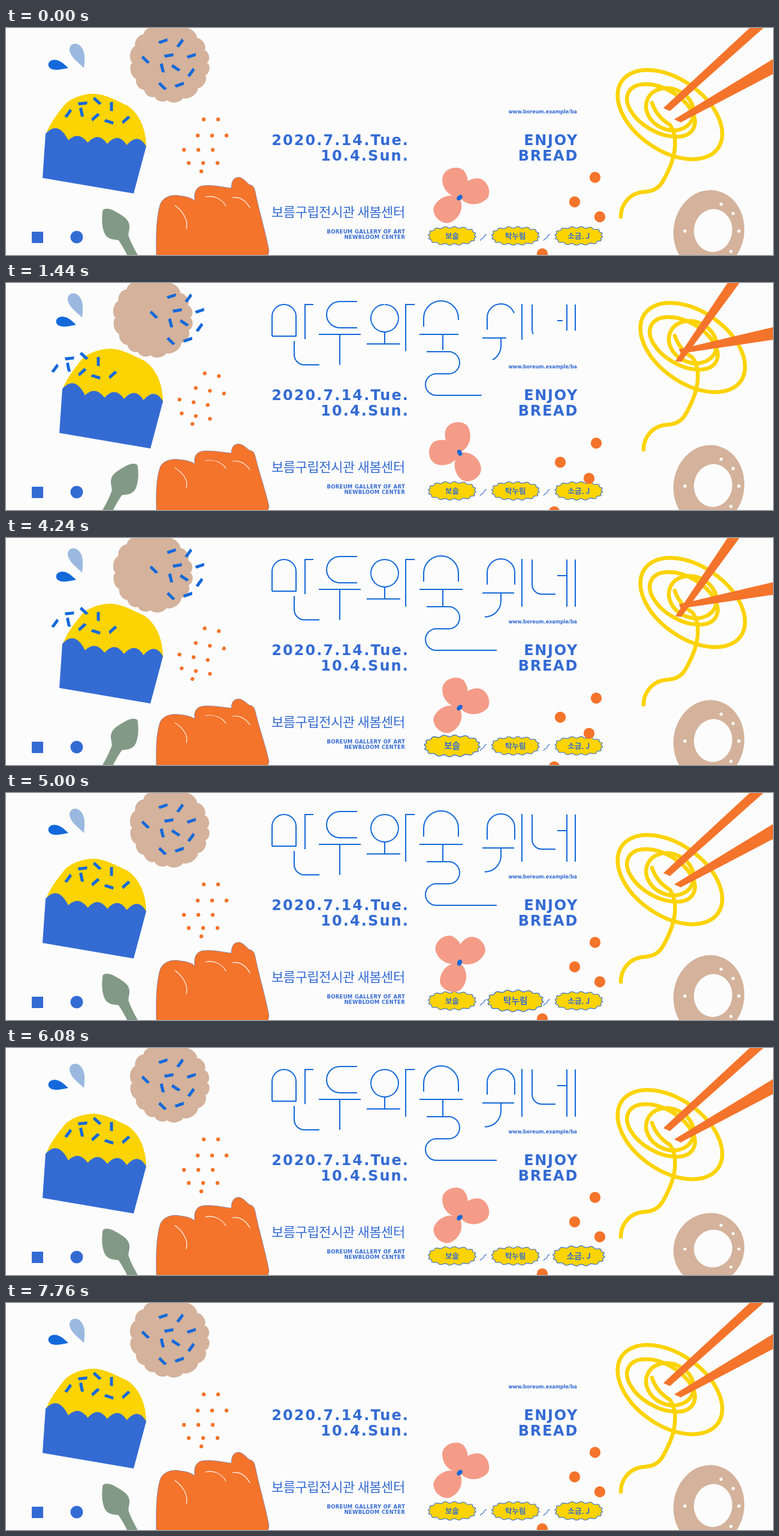
Write an HTML page with a canvas that moves like this. It is 1280x380 px and loops after 8680 ms.

```html
<!DOCTYPE html>
<html lang="ko">
<head>
<meta charset="utf-8">
<title>만두와술 쉬네</title>
<style>
html, body { margin: 0; width: 100%; height: 100%; overflow: hidden; background: #fcfcfc; }
canvas { display: block; width: 1280px; height: 380px; }
</style>
</head>
<body>
<canvas id="stage" width="1280" height="380"></canvas>
<script>
const ctx = document.getElementById('stage').getContext('2d');
const LOOP = 8680, STEP = 40, SWAP = 1240, TURN = Math.PI * 2;
const C = {
  paper: '#fcfcfc', yellow: '#fcd303', orange: '#f4742b', blue: '#346bd3', vivid: '#1469da',
  tan: '#d4b29b', pink: '#f49c88', green: '#829a85', sky: '#9bb9df'
};
const WIDE = '"DejaVu Sans", sans-serif';
const HANGUL = '"Noto Sans CJK KR", "Noto Sans CJK", sans-serif';

const rad = deg => deg * Math.PI / 180;
const clamp = x => Math.min(1, Math.max(0, x));
const ease = x => (1 - Math.cos(Math.PI * clamp(x))) / 2;
const progress = (t, start, length) => ease((t - start) / length);
// rises for one half and falls for the next
const pulse = (t, start, half) => progress(t, start, half) - progress(t, start + half, half);

function fill(path, color) {
  ctx.fillStyle = color;
  ctx.fill(path);
}

function stroke(path, color, width) {
  ctx.strokeStyle = color;
  ctx.lineWidth = width;
  ctx.stroke(path);
}

function dot(x, y, radius, color) {
  ctx.fillStyle = color;
  ctx.beginPath();
  ctx.arc(x, y, radius, 0, TURN);
  ctx.fill();
}

function oval(x, y, rx, ry, tilt) {
  const path = new Path2D();
  path.ellipse(x, y, rx, ry, rad(tilt), 0, TURN);
  return path;
}

// Closed outline from a function of the angle
function outline(point) {
  const path = new Path2D();
  for (let a = 0; a < TURN; a += TURN / 240) path.lineTo(...point(a));
  path.closePath();
  return path;
}

function at(x, y, draw, { angle = 0, sx = 1, sy = sx } = {}) {
  ctx.save();
  ctx.translate(x, y);
  ctx.rotate(rad(angle));
  ctx.scale(sx, sy);
  draw();
  ctx.restore();
}

function text(str, x, y, font, align = 'right', spacing = 0) {
  ctx.font = font;
  ctx.textAlign = align;
  ctx.letterSpacing = spacing + 'px';
  ctx.fillStyle = C.blue;
  ctx.fillText(str, x, y);
}

// Title strokes, one group per syllable
const title = [
  ['M444 89V56A20 20 0 0 1 484 56V89H444', 'M513 36H499V94', 'M481 97V120A17 17 0 0 0 498 137H523'],
  ['M586 31H557A22 22 0 0 0 557 75H586', 'M522 86H592', 'M557 86V137'],
  ['M632 36A23 23 0 1 1 631.9 36', 'M632 82V102', 'M602 102H658', 'M682 36H667V115'],
  ['M697 73V59A29 29 0 0 1 755 59V73', 'M690 86H762', 'M729 86V115',
    'M702 115H739A18 18.5 0 0 1 739 152H718A18 18 0 0 0 718 188H819'],
  ['M803 78V58A23 23 0 0 1 849 58V78', 'M795 92H848', 'M826 92V106A27 27 0 0 1 799 132', 'M861 35V115'],
  ['M878 36V78A16 16 0 0 0 894 94H917', 'M920 63H936', 'M936 36V115', 'M950 36V115']
].map(group => group.map(d => {
  const el = document.createElementNS('http://www.w3.org/2000/svg', 'path');
  el.setAttribute('d', d);
  return { path: new Path2D(d), length: el.getTotalLength() };
}));

function drawTitle(t) {
  const left = 1 - progress(t, 6560, 1200);
  ctx.lineCap = 'butt';
  title.forEach((group, i) => {
    const shown = progress(t, i * 160, 1200) * left;
    if (shown < 0.001) return;
    for (const { path, length } of group) {
      ctx.setLineDash([length * shown, length + 2]);
      stroke(path, C.vivid, 2);
    }
  });
  ctx.setLineDash([]);
}

const drop = new Path2D('M0 0C-10 -6 -18 -10 -26 -8C-37 -5 -36 7 -26 8C-18 9 -10 4 0 0Z');

function drawDrops(swapped) {
  at(swapped ? 127 : 130, swapped ? 58 : 67, () => fill(drop, C.sky), { angle: 66, sx: 1.3 });
  at(swapped ? 117 : 104, swapped ? 70 : 67, () => fill(drop, C.vivid), { angle: 13 });
}

function sprinkle(x, y, angle) {
  at(x, y, () => fill(new Path2D('M-8 -2L8 -3L7 2L-7 3Z'), C.vivid), { angle });
}

const cookie = outline(a => {
  const bump = Math.abs(Math.sin(a * 8 + 0.5 * Math.sin(3 * a)));
  const r = 62 + 5 * Math.sqrt(bump) + Math.sin(2 * a);
  return [r * Math.cos(a), r * Math.sin(a)];
});

function drawCookie(swapped) {
  at(swapped ? 245 : 273, 58, () => fill(cookie, C.tan));
  const x = swapped ? 286 : 272, y = 60;
  for (let i = 0; i < 8; i++) {
    const a = rad(42 * i - 104);
    if (i !== 6) sprinkle(x + 40 * Math.cos(a), y + 39 * Math.sin(a), i < 5 ? -15 - 35 * (i % 2) : 48);
  }
  for (let i = 0; i < 3; i++) {
    const a = rad(120 * i - 90);
    sprinkle(x + 13 * Math.cos(a), y + 14 * Math.sin(a), 43 * i - 6);
  }
}

const cream = new Path2D('M66 180C70 165 84 145 100 126C112 116 130 110 147 110C168 111 185 122 203 130C220 142 234 165 234 200L150 210Z');
const cup = new Path2D('M66 177Q87 154 104 188');
for (let i = 1; i <= 4; i++) cup.quadraticCurveTo(88 + 33 * i, 170 + i, 104 + 32.5 * i, 190 + 2 * i);
cup.lineTo(213, 277);
cup.lineTo(61, 251);

function drawCake(swapped) {
  at(swapped ? 28 : 0, 0, () => {
    fill(cream, C.yellow);
    fill(cup, C.blue);
  });
  at(swapped ? -22 : 0, 0, () => {
    for (let i = 0; i < 5; i++) sprinkle(104 + 24 * i, 122 + 6.5 * (i - 1.8) ** 2, 48 * i - 50);
    for (let i = 0; i < 3; i++) sprinkle(126 + 23 * i, 141 + 8 * i, 82 + 60 * i);
  });
}

// Rows of crumbs: count, first x, y around the middle
const crumbRows = [[2, -3, -45], [3, -13, -18], [3, -36, 6], [3, -28, 28], [1, -7, 42]];

function drawCrumbs(swapped) {
  at(swapped ? 326 : 333, swapped ? 196 : 198, () => {
    for (const [count, x, y] of crumbRows) {
      for (let i = 0; i < count; i++) dot(x + 24 * i, y, 3.2, C.orange);
    }
  }, { angle: swapped ? 11 : 0 });
}

const hand = new Path2D('M-94 2C-95 -35 -94 -62 -88 -84C-83 -99 -65 -102 -54 -99Q-39 -98 -30 -91C-32 -106 -27 -114 -17 -116C0 -118 15 -114 31 -112C31 -126 37 -131 45 -130C52 -128 57 -121 61 -118Q69 -117 71 -106C77 -75 88 -40 94 -7L92 2Z');
const knuckles = new Path2D('M-63 -83C-52 -75 -40 -60 -44 -44M-12 -97C2 -101 16 -93 22 -82M33 -96C45 -98 55 -91 62 -79');

function drawHand(swapped) {
  at(345, 380, () => {
    fill(hand, C.orange);
    stroke(hand, C.blue, 0.5);
    stroke(knuckles, C.paper, 1.1);
  }, { sy: swapped ? 0.85 : 1, sx: 1 });
}

const spoon = new Path2D('M-29 305C-26 301 -17 302 -10 306C0 312 13 318 15 328C17 336 13 342 14 348C18 360 25 372 32 385H14C8 372 2 362 -3 355C-12 354 -21 354 -26 344C-31 332 -31 318 -29 305Z');

const noodles = [
  oval(1108, 145, 98, 60, 35),
  oval(1093, 138, 62, 36, 30),
  oval(1108, 136, 41, 34, 25),
  new Path2D('M1078 125C1084 143 1096 155 1108 162C1122 182 1117 212 1107 235C1097 256 1092 272 1068 274C1040 275 1026 296 1026 316')
];
const chopsticks = [
  new Path2D('M1115 153L1126 158L1280 77V52ZM1097 134L1108 139L1264 0H1241Z'),
  new Path2D('M1123 111L1126 118L1280 95V74ZM1117 131L1127 132L1224 0H1204Z')
];

function drawNoodles(swapped) {
  at(swapped ? 38 : 0, swapped ? -37 : 0, () => noodles.forEach(n => stroke(n, C.yellow, 6.5)));
  fill(chopsticks[+swapped], C.orange);
}

const donut = oval(0, 28, 59, 69, 8);
const hole = oval(7, 27, 32, 36, 6);

function drawDonut(t) {
  const squash = 1 - 0.41 * (pulse(t, 1760, 600) + pulse(t, 5100, 600));
  at(1173, 312, () => {
    fill(donut, C.tan);
    fill(hole, C.paper);
    for (const a of [-70, -38, 0, 45, 180]) {
      dot(5 + 45 * Math.cos(rad(a)), 28 + 48 * Math.sin(rad(a)), 2.7, C.paper);
    }
  }, { sx: 1, sy: squash });
}

const petal = new Path2D('M0 0C6 -18 24 -25 40 -19C55 -12 54 13 41 19C25 25 6 18 0 0Z');

function drawFlower(t) {
  const turn = progress(t, 0, 2060) - progress(t, 4800, 1200);
  at(757, 284, () => {
    for (const angle of [-105, -22, 136]) at(0, 0, () => fill(petal, C.pink), { angle });
    fill(oval(0, 0, 5.5, 3.8, -43), C.vivid);
  }, { angle: turn * 360 });
}

const badge = outline(a => {
  const c = Math.cos(a), s = Math.sin(a);
  const r = (Math.abs(c) ** 2.6 + Math.abs(s) ** 2.6) ** (-1 / 2.6);
  const wave = 1.3 * Math.sin(a * 16);
  return [c * (38.5 * r + wave), s * (14.3 * r + wave)];
});
const squiggle = new Path2D('M-5 6C-3 0 1 4 1 0C1 -4 4 -2 5 -5');

function drawBadges(t) {
  ['보슬', '탁누림', '소금. J'].forEach((name, i) => {
    const x = 744.5 + i * 105.7;
    at(x, 348, () => {
      fill(badge, C.yellow);
      stroke(badge, C.blue, 1.1);
      text(name, 0, 4.5, '700 12.5px ' + HANGUL, 'center');
    }, { sx: 1 + 0.17 * pulse(t, 3560 + i * 720, 720) });
    if (i < 2) at(x + 52, 350, () => stroke(squiggle, C.blue, 1.1));
  });
}

function drawBalls(swapped) {
  const centers = swapped
    ? [[985, 268], [925, 300], [973, 327], [915, 383]]
    : [[983, 250], [949, 291], [991, 316], [895, 378]];
  for (const [x, y] of centers) dot(x, y, 9.2, C.orange);
}

function drawWords() {
  const big = '700 24px ' + WIDE, small = '700 8.5px ' + WIDE;
  text('2020.7.14.Tue.', 673, 196, big, 'right', 2.1);
  text('10.4.Sun.', 673, 222, big, 'right', 2.1);
  text('ENJOY', 955, 196, big, 'right', 1.7);
  text('BREAD', 955, 222, big, 'right', 1.7);
  text('www.boreum.example/ba', 953, 143, '700 8px ' + WIDE);
  text('보름구립전시관 새봄센터', 443, 316, '400 22px ' + HANGUL, 'left', -0.4);
  text('BOREUM GALLERY OF ART', 666, 344, small, 'right', 0.3);
  text('NEWBLOOM CENTER', 666, 353, small, 'right', 0.3);
  ctx.fillRect(43, 341, 19, 19);
  dot(118, 350, 10.5, C.blue);
}

function draw(t) {
  const swapped = t >= STEP && Math.floor((t - STEP) / SWAP) % 2 === 1;
  ctx.fillStyle = C.paper;
  ctx.fillRect(0, 0, 1280, 380);
  ctx.lineCap = ctx.lineJoin = 'round';
  drawDrops(swapped);
  drawCookie(swapped);
  drawCake(swapped);
  drawCrumbs(swapped);
  drawHand(swapped);
  at(190.5, 0, () => fill(spoon, C.green), { sx: swapped ? -1 : 1, sy: 1 });
  drawNoodles(swapped);
  drawDonut(t);
  drawWords();
  drawTitle(t);
  drawBadges(t);
  drawFlower(t);
  drawBalls(swapped);
}

const start = performance.now();
function tick() {
  const t = (performance.now() - start) % LOOP;
  draw(Math.floor(t / STEP) * STEP);
  requestAnimationFrame(tick);
}
tick();
</script>
</body>
</html>
```
